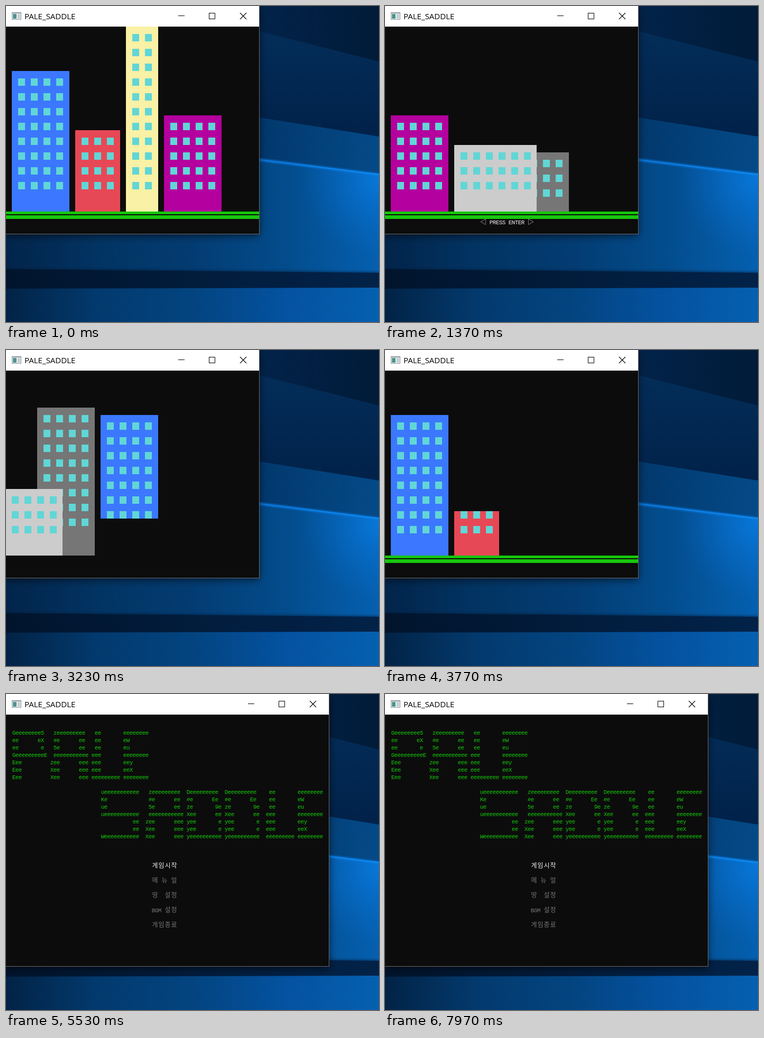
Animation of 706 by 598 pixels, one loop 8000 ms. Source, as an HTML page with a canvas:

```html
<!DOCTYPE html>
<html lang="ko">
<head>
<meta charset="utf-8">
<title>PALE_SADDLE</title>
<style>
  html, body { margin: 0; width: 100%; height: 100%; overflow: hidden; background: #022a54; }
  canvas { display: block; }
</style>
</head>
<body>
<canvas id="stage" width="706" height="598"></canvas>
<script>
const ctx = document.getElementById('stage').getContext('2d');
const LOOP = 8000, TOP = 39, CELL = 6, ROW = 14, GROUND = 389;
const GREEN = '#16c60c', WHITE = '#f2f2f2', DIM = '#767676', BLACK = '#0c0c0c';

// Buildings: left edge, width, height in console rows, window columns
const blue = { x: 359, w: 109, rows: 19, cols: 4, color: '#3b78ff' };
const red = { x: 131, w: 85, rows: 11, cols: 3, color: '#e74856' };
const yellow = { x: 227, w: 61, rows: 25, cols: 2, color: '#f9f1a5' };
const purple = { x: 299, w: 109, rows: 13, cols: 4, color: '#b4009e' };
const silver = { x: 131, w: 156, rows: 9, cols: 6, color: '#cccccc' };
const gray = { x: 239, w: 109, rows: 20, cols: 4, color: '#767676' };
const at = (building, x) => ({ ...building, x });
const firstCity = [at(blue, 11), red, yellow, purple];
const secondCity = [at(purple, 11), gray, silver, blue];

const letters = {
  P: ['Geeeeeeee5', 'ee      eX', 'ee       e', 'GeeeeeeeeeE', 'Eee', 'Eee', 'Eee'],
  A: [' zeeeeeeeee', ' #e      ee', ' 5e      ee', ' eeeeeeeeeee', 'zee      eee', 'Xee      eee', 'Xee      eee'],
  L: [' ee', ' ee', ' ee', 'eee', 'eee', 'eee', 'eeeeeeeee'],
  E: ['eeeeeeee', 'eW', 'eu', 'eeeeeeee', 'eey', 'eeX', 'eeeeeeee'],
  S: ['ueeeeeeeeeee', 'Ke', 'ue', 'ueeeeeeeeeee', '          ee', '          ee', 'Weeeeeeeeeee'],
  D: ['Deeeeeeeee', '#e      Ee', 'ze       9e', 'Xee      ee', 'yee       e', 'yee       e', 'yeeeeeeeeee'],
};
const banner = [
  { word: 'PALE', cols: [2, 14, 27, 37], row: 2 },
  { word: 'SADDLE', cols: [30, 44, 57, 69, 82, 92], row: 10 },
];
const menu = ['게임시작', '메 뉴 얼', '땅  설정', 'BGM 설정', '게임종료'];
const selections = [[6130, 1], [6300, 2], [6470, 3], [6630, 4], [6770, 0]];
const blinks = [[5130, 5230], [5370, 5530], [5870, 6100], [6800, 7300], [7530, 7970]];

function rect(color, x, y, w, h) {
  ctx.fillStyle = color;
  ctx.fillRect(x, y, w, h);
}

function gradient(x0, y0, x1, y1, ...colors) {
  const g = ctx.createLinearGradient(x0, y0, x1, y1);
  colors.forEach((c, i) => g.addColorStop(i / (colors.length - 1), c));
  return g;
}

// Fills everything below the slanted edge from (x0, y0) to the right side at y1
function below(fill, x0, y0, y1) {
  ctx.fillStyle = fill;
  ctx.beginPath();
  ctx.moveTo(x0, y0);
  ctx.lineTo(706, y1);
  ctx.lineTo(706, 598);
  ctx.lineTo(x0, 598);
  ctx.fill();
}

function line(color, width, ...points) {
  ctx.strokeStyle = color;
  ctx.lineWidth = width;
  ctx.beginPath();
  for (let i = 0; i < points.length; i += 4) {
    ctx.moveTo(points[i], points[i + 1]);
    ctx.lineTo(points[i + 2], points[i + 3]);
  }
  ctx.stroke();
}

function drawWallpaper() {
  rect(gradient(480, 0, 706, 0, '#02234a', '#011b38'), 0, 0, 706, 598);
  below(gradient(480, 50, 480, 240, '#032d58', '#01224a'), 480, 48, 105);
  below(gradient(480, 0, 706, 0, '#02386c', '#044a88'), 480, 211, 247);
  below(gradient(0, 0, 706, 0, '#02244a', '#023463', '#033c72', '#034c8c', '#0560b0'), 0, 230, 318);
  const glow = ctx.createRadialGradient(706, 325, 0, 706, 325, 150);
  glow.addColorStop(0, 'rgba(8,128,232,.75)');
  glow.addColorStop(1, 'rgba(8,110,210,0)');
  below(glow, 480, 290, 318);
  line('rgba(10,120,225,.35)', 8, 480, 291, 706, 319);
  line(gradient(480, 0, 706, 0, '#0a74d8', '#0c8af0'), 3, 480, 291, 706, 319);

  ctx.save();
  ctx.shadowColor = '#011a38';
  ctx.shadowBlur = 6;
  below(gradient(0, 0, 706, 0, '#01142c', '#021c3c', '#022248'), 0, 498, 505);
  ctx.restore();
  below(gradient(0, 0, 706, 0, '#022346', '#033a6e', '#034480', '#0452a0', '#0560b0'), 0, 535, 533);
}

function drawWindow(w, h) {
  ctx.save();
  ctx.shadowColor = 'rgba(0,0,0,.6)';
  ctx.shadowBlur = 14;
  ctx.shadowOffsetY = 3;
  rect('#6b6b6b', 0, 0, w, h);
  ctx.restore();
  rect('#fff', 0, 0, w - 1, TOP);
  rect(BLACK, 0, TOP, w - 1, h - TOP - 1);

  rect('#8d9499', 11, 12, 18, 14);
  rect('#f4f6f7', 12, 14, 16, 11);
  rect('#4f9490', 13, 15, 7, 9);
  rect('#c3ccd0', 22, 15, 5, 9);
  ctx.fillStyle = '#000';
  ctx.font = '15px "Open Sans", "Noto Sans", sans-serif';
  ctx.textAlign = 'left';
  ctx.fillText('PALE_SADDLE', 35, 25);

  line('#000', 1, w - 154, 18.5, w - 142, 18.5);
  ctx.strokeRect(w - 95.5, 13.5, 11, 11);
  line('#000', 1.1, w - 37, 13, w - 25, 25, w - 25, 13, w - 37, 25);
}

// Console text: one cell per Latin character, two per wide character
function print(text, col, row, color) {
  ctx.fillStyle = color;
  ctx.textAlign = 'center';
  for (const ch of text) {
    const wide = ch.charCodeAt(0) > 255;
    ctx.font = wide ? '300 12px "Noto Sans Mono CJK KR", "Noto Sans CJK KR", sans-serif'
                    : '11px "Liberation Mono", monospace';
    const width = wide ? 2 : 1;
    if (ch !== ' ') ctx.fillText(ch, (col + width / 2) * CELL, TOP + row * ROW + 10);
    col += width;
  }
}

// Clips a building to the span of rows that is visible
function drawBuilding(b, shift, from, to, lastWindow = 350) {
  const top = GROUND - b.rows * ROW, x = b.x - shift;
  ctx.save();
  ctx.beginPath();
  ctx.rect(0, top + from * ROW, 479, (to - from) * ROW);
  ctx.clip();
  rect(b.color, x, top, b.w, b.rows * ROW);
  for (let y = top + ROW; y < lastWindow; y += 2 * ROW)
    for (let i = 0; i < b.cols; i++) rect('#61d6d6', x + 12 + i * 24, y, 13, ROW);
  ctx.restore();
}

const rise = (b, rows) => drawBuilding(b, 0, b.rows - rows, b.rows);
const risenRows = (b, t, start, step) =>
  Math.max(0, Math.min(b.rows, Math.floor((t - start) / step) + 1));

function drawGround() {
  rect(GREEN, 0, GROUND, 479, 5);
  rect(GREEN, 0, 396, 479, 7);
}

// The city jumps two cells at a time; every jump repaints it row by row
function scrollCity(city, steps, progress) {
  const position = steps * progress ** 1.419;
  const shift = Math.floor(position) * 2 * CELL;
  const visible = city.filter(b => b.x + b.w - shift > 0);
  const total = visible.reduce((sum, b) => sum + b.rows, 0);
  let left = Math.round((position % 1) * total);
  for (const b of visible) {
    drawBuilding(b, shift, 0, Math.min(left, b.rows), 340);
    left = Math.max(0, left - b.rows);
  }
}

function drawIntro(t) {
  drawWindow(480, 432);
  if (t >= 130 && t < 640) return scrollCity(firstCity, 24, (t - 120) / 520);
  if (t >= 2700 && t < 3500) return scrollCity(secondCity, 29, (t - 2690) / 825);

  drawGround();
  if (t < 130) {
    firstCity.forEach(b => rise(b, b.rows));
  } else if (t < 2700) {
    rise(at(purple, 11), purple.rows);
    rise(gray, risenRows(gray, t, 1002, 52.5));
    rise(silver, risenRows(silver, t, 670, 30));
    rise(blue, risenRows(blue, t, 2037, 32));
    print('◁ PRESS ENTER ▷', 30, 26, WHITE);
  } else {
    rise(at(blue, 11), blue.rows);
    rise(red, risenRows(red, t, 3555, 40));
    rise(yellow, risenRows(yellow, t, 3995, 24));
  }
}

function drawMenu(t) {
  drawWindow(612, 516);
  const lines = Math.floor((t - 4400) / 25);
  banner.forEach(({ word, cols, row }, part) => {
    [...word].forEach((letter, i) => letters[letter].forEach((text, y) => {
      if (part * 7 + y < lines) print(text, cols[i], row + y, GREEN);
    }));
  });
  if (t < 4800) return;

  let selected = 0;
  for (const [time, item] of selections) if (t >= time) selected = item;
  const dimmed = blinks.some(([start, end]) =>
    t >= start && t < end && Math.round((t - start) * 0.03) % 2 === 0);
  menu.forEach((text, i) => print(text, 46, 20 + i * 2, i === selected && !dimmed ? WHITE : DIM));
}

function frame(now) {
  // Screen updates at 30 per second, expressed in rounded milliseconds
  const tick = Math.floor(((now % LOOP) + 4) * 0.03);
  const t = Math.round(tick * 10 / 3) * 10 % LOOP;
  drawWallpaper();
  if (t < 4370) drawIntro(t);
  else drawMenu(t);
  requestAnimationFrame(frame);
}
const start = performance.now();
frame(0);
requestAnimationFrame(function loop() {
  frame.origin = start;
});
</script>
</body>
</html>
```
